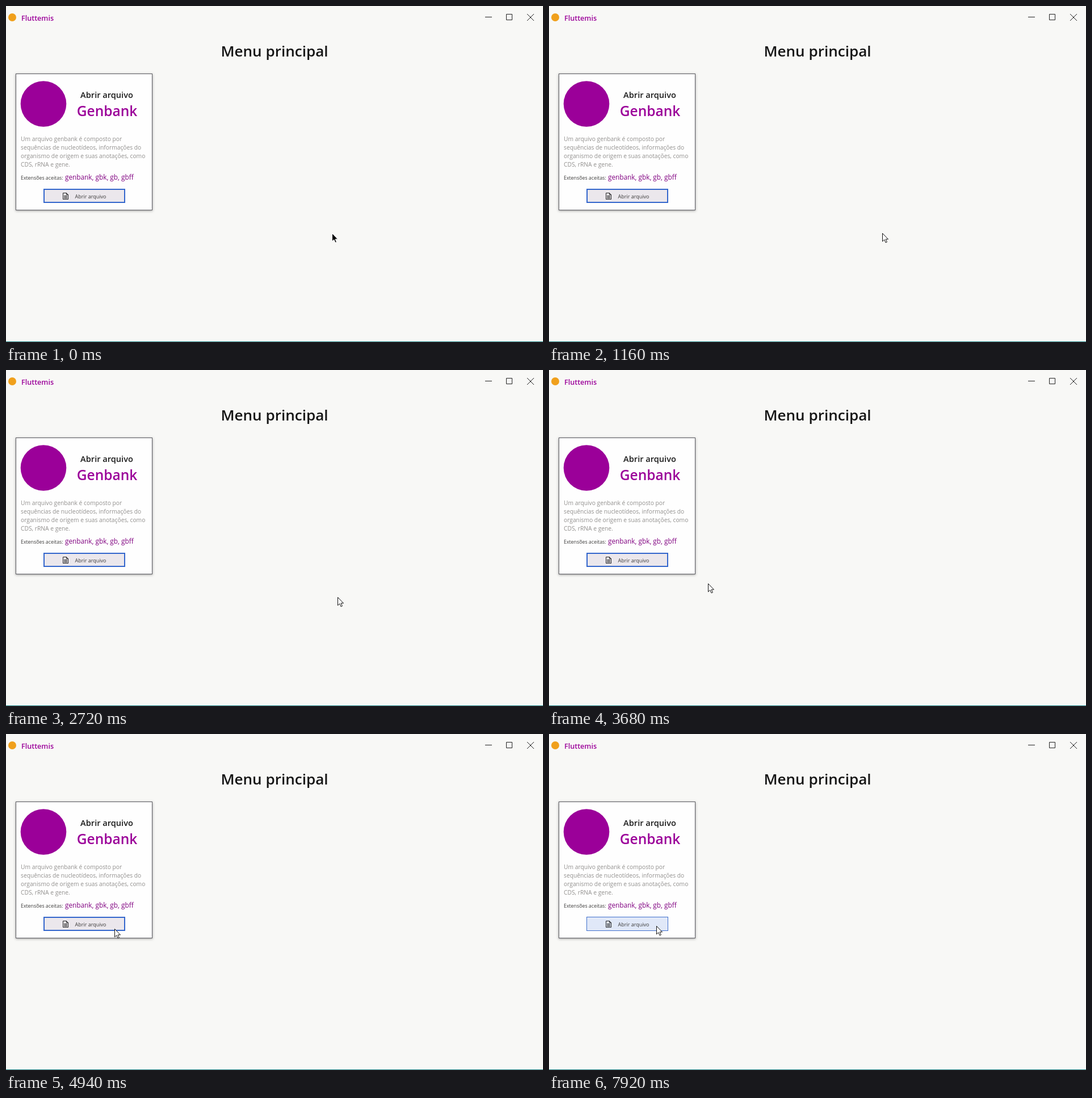
Write an HTML page that moves like this. It is 946 px wide and 592 px high and loops after 8 s.

```html
<!DOCTYPE html>
<html lang="pt-BR">
<head>
<meta charset="utf-8">
<title>Menu principal</title>
<style>
  html, body { margin: 0; width: 100%; height: 100%; overflow: hidden; background: #f8f8f6; }
  svg { display: block; font-family: "Open Sans", "Noto Sans", sans-serif; }
  .card { fill: #fefefe; stroke: #5c5c62; filter: drop-shadow(0 1px 2px #4448); }
  .accent { fill: #9b0099; }
  .body { fill: #92908e; font-size: 10.28px; }
  .line { fill: none; stroke: #222; }
  .small { fill: #3b3a39; }
  .strong { font-weight: 600; }
</style>
</head>
<body>
<svg width="946" height="592" viewBox="0 0 946 592">
  <rect width="946" height="592" fill="#f8f8f6"/>
  <rect y="591" width="946" height="1" fill="#1d8588"/>

  <circle cx="11" cy="20" r="7" fill="#f0a01c"/>
  <text class="accent strong" x="27" y="25.5" font-size="12.6">Fluttemis</text>
  <path class="line" d="M844 19.5h12M881.5 14.5h10v10h-10zM918 14l12 12M930 14l-12 12"/>

  <text class="strong" x="473" y="88.5" font-size="26.1" text-anchor="middle" fill="#151515">Menu principal</text>

  <rect class="card" x="17.5" y="119.5" width="240" height="240"/>
  <circle class="accent" cx="66" cy="172.5" r="40.3"/>
  <text class="strong" x="177.5" y="161.5" font-size="14.6" text-anchor="middle" fill="#1b1b1b">Abrir arquivo</text>
  <text class="accent strong" x="178" y="193.5" font-size="24.5" text-anchor="middle">Genbank</text>

  <g class="body">
    <text x="26" y="238">Um arquivo genbank é composto por</text>
    <text x="26" y="253">sequências de nucleotídeos, informações do</text>
    <text x="26" y="268">organismo de origem e suas anotações, como</text>
    <text x="26" y="283">CDS, rRNA e gene.</text>
  </g>
  <text class="small" x="26" y="306" font-size="8.8">Extensões aceitas:</text>
  <text x="104" y="306" font-size="11.8" fill="#800080">genbank, gbk, gb, gbff</text>

  <rect id="focused" x="67" y="323" width="142" height="23" fill="#ebe7ec" stroke="#3366cc" stroke-width="2"/>
  <rect id="hovered" x="66.5" y="322.5" width="143" height="24" fill="#e0e8f8" stroke="#3f6fcc"/>
  <path class="line" d="M100.5 329.5h6l3 3v8h-9zM106.5 329.5v3h3M102 334.5h6M102 336.5h6M102 338.5h6"/>
  <text class="small" x="149" y="338.8" font-size="9" text-anchor="middle">Abrir arquivo</text>

  <path id="cursor" d="M.5 .5v14.3l3.3-3.1 2.3 5.2 2.3-1-2.3-5h4.4z"/>
</svg>
<script>
const DURATION = 8000;
const WHITE_POINTER_START = 400;
const HOVER_START = 5060;
// Pointer stops: time in ms, x, y
const stops = [
  [0, 574, 400], [780, 587, 400], [2560, 587, 400], [2720, 584, 400],
  [3340, 343, 396], [3680, 280, 376], [4240, 242, 359],
  [4940, 191, 343], [5300, 189, 338], [DURATION, 189, 338]
];
const byId = id => document.getElementById(id);
const focused = byId("focused"), hovered = byId("hovered"), cursor = byId("cursor");

function pointerAt(time) {
  const next = stops.findIndex(stop => stop[0] > time);
  const [t0, x0, y0] = stops[next - 1];
  const [t1, x1, y1] = stops[next];
  const k = (time - t0) / (t1 - t0);
  return [x0 + (x1 - x0) * k, y0 + (y1 - y0) * k].map(Math.round);
}

function draw(now) {
  const time = now % DURATION;
  const hover = time >= HOVER_START;
  const [fill, stroke] = time < WHITE_POINTER_START ? ["#000", "#fff"] : ["#fff", "#111"];
  focused.setAttribute("visibility", hover ? "hidden" : "visible");
  hovered.setAttribute("visibility", hover ? "visible" : "hidden");
  cursor.setAttribute("transform", `translate(${pointerAt(time)})`);
  cursor.setAttribute("fill", fill);
  cursor.setAttribute("stroke", stroke);
}

function tick() {
  draw(performance.now());
  requestAnimationFrame(tick);
}
tick();
</script>
</body>
</html>
```
